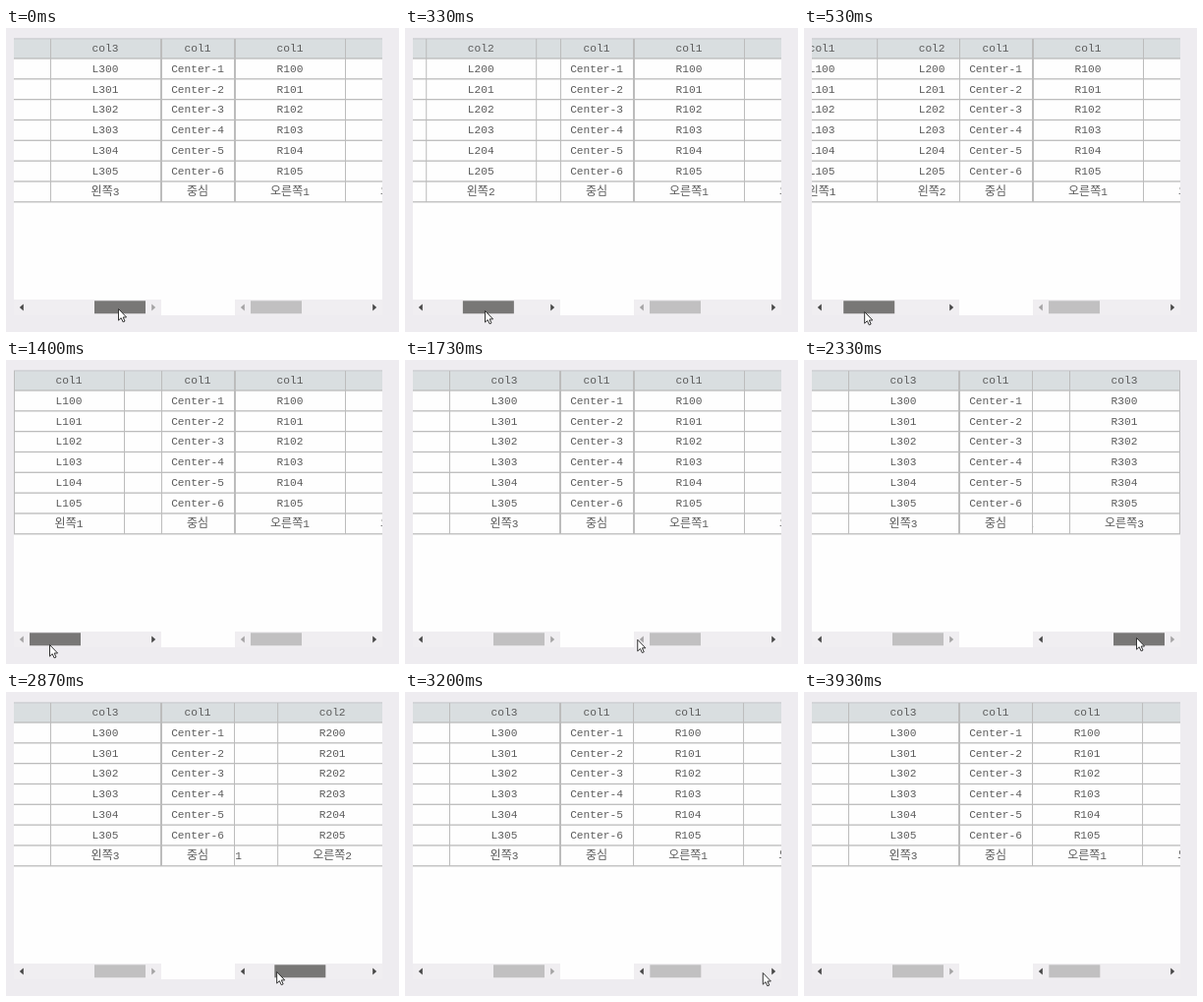
These frames come from a looping animation (400 px wide and 309 px high, 4000 ms). An HTML page:

```html
<!DOCTYPE html>
<html lang="ko">
<head>
<meta charset="utf-8">
<title>Split grid scrolling</title>
<style>
html, body { margin: 0; width: 100%; height: 100%; overflow: hidden; background: #eeecf0; }
svg { display: block; width: 400px; height: 309px; }
text { font: 11.2px "Liberation Mono", monospace; fill: #5c5c5c; text-anchor: middle; white-space: pre; }
.ko { font: 12px "Noto Sans CJK KR", "Noto Sans CJK", sans-serif; }
</style>
</head>
<body>
<svg id="stage" viewBox="0 0 400 309"></svg>
<script>
const NS = 'http://www.w3.org/2000/svg';
const stage = document.getElementById('stage');
const LOOP = 4000, STEPS = 60;
const TOP = 11, PITCH = 20.83, ROWS = 8, COL = 112;
const MAX_SCROLL = 187, TRAVEL = 66;
const LINE = '#bcbcbc', IDLE = '#c1c0c1', HELD = '#787776';
const ARROW_ON = '#484848', ARROW_OFF = '#a5a4a5';

function el(parent, tag, attrs = {}) {
  const node = document.createElementNS(NS, tag);
  for (const k in attrs) node.setAttribute(k, attrs[k]);
  return parent.appendChild(node);
}

const rect = (parent, x, y, width, height, fill) =>
  el(parent, 'rect', { x, y, width, height, fill });

const rule = (parent, x) => rect(parent, x, TOP, 1, PITCH * ROWS - .6, LINE);

function label(parent, x, y, str) {
  const t = el(parent, 'text', { x, y });
  const [, hangul, rest] = str.match(/^([가-힣]*)(.*)$/);
  if (hangul) el(t, 'tspan', { class: 'ko' }).textContent = hangul;
  el(t, 'tspan').textContent = rest;
}

// Header, six body rows and a footer
function column(parent, x, w, head, cell, foot) {
  const cells = [head, ...Array.from({ length: ROWS - 2 }, (_, r) => cell(r)), foot];
  cells.forEach((str, i) => label(parent, x + w / 2, TOP + 13.2 + 20.76 * i, str));
  rule(parent, x + w);
}

function pane(id, x, w) {
  const clip = el(stage, 'clipPath', { id });
  rect(clip, x, 10, w, 170, '#000');
  const body = el(el(stage, 'g', { 'clip-path': `url(#${id})` }), 'g');
  rule(body, x);
  return body;
}

function scrollPane(id, x, w, prefix, name) {
  const body = pane(id, x, w);
  for (let c = 1; c <= 3; c++) {
    column(body, x + COL * (c - 1), COL, 'col' + c, r => prefix + (c * 100 + r), name + c);
  }
  rect(stage, x, 276, 150, 16, '#f0eef1');
  const arrow = (tip, dir) =>
    el(stage, 'path', { d: `M${tip} 284l${-4 * dir} -3.6v7.2z` });
  const prev = arrow(x + 5.8, -1), next = arrow(x + 144.2, 1);
  const thumb = rect(stage, x + 16, 277.3, 52, 13, IDLE);
  return (part, held) => {
    body.setAttribute('transform', `translate(${-part * MAX_SCROLL} 0)`);
    thumb.setAttribute('x', x + 16 + part * TRAVEL);
    thumb.setAttribute('fill', held ? HELD : IDLE);
    prev.setAttribute('fill', part > 0 ? ARROW_ON : ARROW_OFF);
    next.setAttribute('fill', part < 1 ? ARROW_ON : ARROW_OFF);
  };
}

// Sheet, header band and row rules
rect(stage, 8, TOP, 375, 281, '#fefefe');
rect(stage, 8, TOP, 375, 20, '#d9dee0');
rect(stage, 8, TOP - .6, 375, 1, '#c4c6c8');
for (let i = 1; i <= ROWS; i++) rect(stage, 8, TOP - 1.5 + PITCH * i, 375, 1.3, LINE);

const setLeft = scrollPane('left', 8, 150, 'L', '왼쪽');
const setRight = scrollPane('right', 233, 150, 'R', '오른쪽');
column(pane('mid', 158, 75), 158, 74, 'col1', r => 'Center-' + (r + 1), '중심');

const cursor = el(stage, 'path', {
  d: 'M.5 .5V12.2L3.2 9.7L5.1 13.8L7 13L5.2 9H8.6Z',
  fill: '#fff', stroke: '#333', 'stroke-linejoin': 'round'
});

const ramp = (k, from, to) => Math.min(1, Math.max(0, (k - from) / (to - from)));

// Each gesture runs 0 to 1; the picture advances fifteen steps a second
function draw(ms) {
  const k = Math.floor((ms % LOOP + 4) * STEPS / LOOP) % STEPS;
  const leftOut = ramp(k, 0, 10.6), leftBack = ramp(k, 21, 23);
  const cross = ramp(k, 23, 27);
  const rightOut = ramp(k, 28, 35) ** 2, rightBack = ramp(k, 39, 45.3);
  const leave = ramp(k, 45.3, 49);

  setLeft(1 - leftOut + leftBack, k < 24);
  setRight(rightOut - .995 * rightBack, k >= 28 && k < 46);
  const x = 114 - 70 * leftOut + 70 * leftBack + 163 * cross
    + 61 * rightOut - 99 * rightBack + 171 * leave;
  const y = 285 + 4 * leftOut - 7 * cross + 3 * rightBack;
  cursor.setAttribute('transform', `translate(${x} ${y})`);
}

const start = performance.now();
function tick() {
  draw(performance.now() - start);
  requestAnimationFrame(tick);
}
draw(0);
requestAnimationFrame(tick);
</script>
</body>
</html>
```
